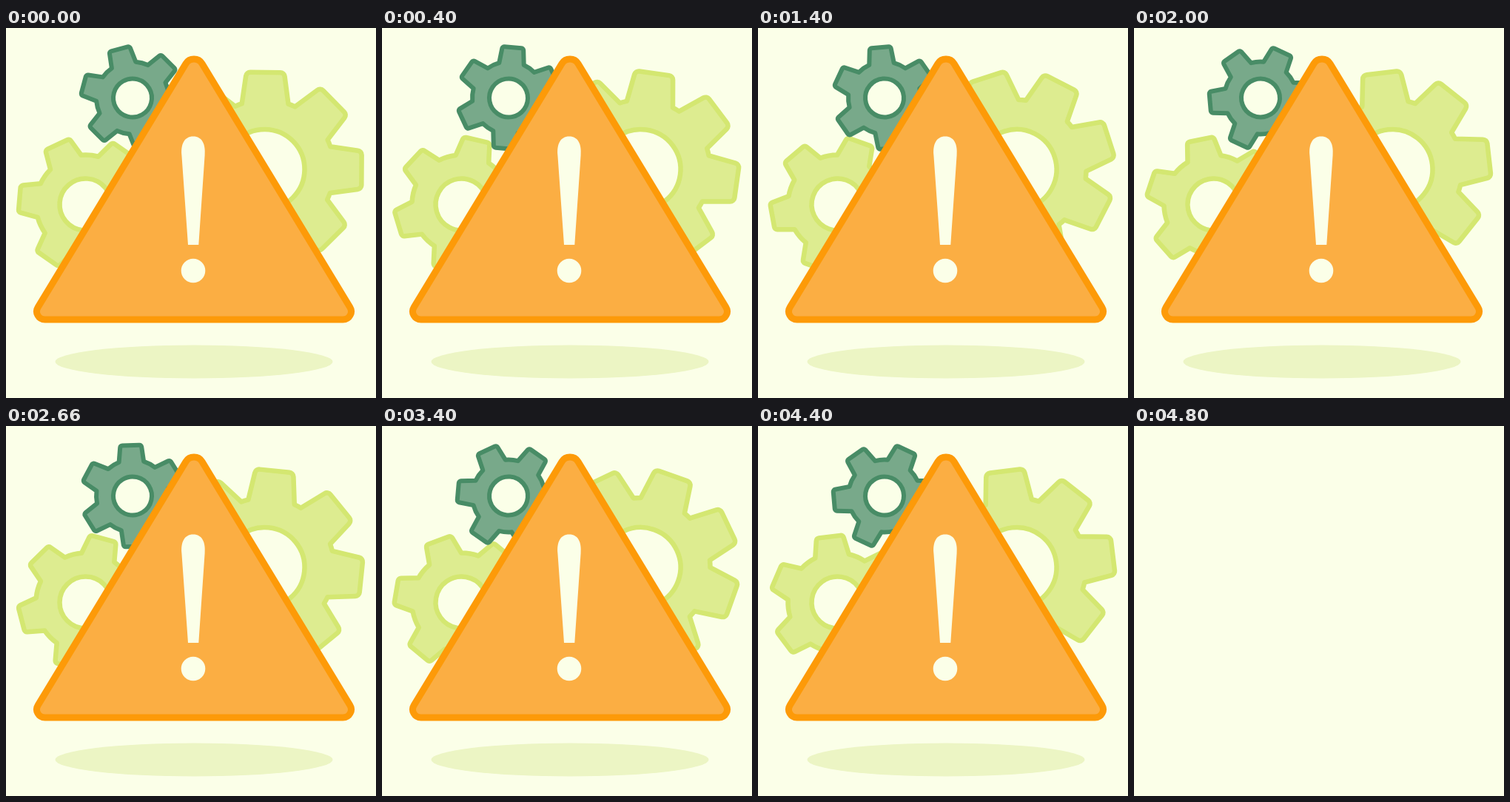
Animation of 500 by 500 pixels, one loop 4.82 s. Source, as an HTML page with a canvas:

```html
<!DOCTYPE html>
<html lang="en">
<head>
<meta charset="utf-8">
<title>Warning gears</title>
<style>
  html, body { margin: 0; width: 100%; height: 100%; overflow: hidden; background: #fbffe8; }
  canvas { display: block; width: 500px; height: 500px; }
</style>
</head>
<body>
<canvas id="stage" width="500" height="500"></canvas>
<script>
const ctx = document.getElementById('stage').getContext('2d');
const LOOP = 4820, SPIN = 4800, STEP = 20;
const BG = '#fbffe8';
const LIME = { fill: '#ddec90', stroke: '#d4e771' };
const GREEN = { fill: '#78a98a', stroke: '#488c66' };
const rad = deg => deg * Math.PI / 180;

// Each turn covers a whole number of teeth; lead is a gentle ease in degrees.
const gears = [
  { x: 349.5, y: 191, teeth: 8, tip: 131, tipHalf: 25.5, root: 94, base: 19.5,
    hole: 54, corner: 6, line: 6.5, paint: LIME, start: 0.4, turn: 90, lead: 0.6 },
  { x: 107.5, y: 238.5, teeth: 6, tip: 89.5, tipHalf: 18, root: 67, base: 20,
    hole: 35, corner: 4, line: 6.5, paint: LIME, start: 4.9, turn: -240, lead: -6.6 },
  { x: 171, y: 94.5, teeth: 6, tip: 68.5, tipHalf: 14.2, root: 49, base: 20,
    hole: 26, corner: 3, line: 6, paint: GREEN, start: 15, turn: 240, lead: 0 }
];

function paintPath({ fill, stroke }, width) {
  ctx.fillStyle = fill;
  ctx.strokeStyle = stroke;
  ctx.lineWidth = width;
  ctx.lineJoin = 'round';
  ctx.fill();
  ctx.stroke();
}

function drawGear(g, u) {
  const pitch = 2 * Math.PI / g.teeth, base = rad(g.base);
  const tipAngle = Math.atan2(g.tipHalf, g.tip), tipRadius = Math.hypot(g.tip, g.tipHalf);
  const at = (r, a) => [r * Math.cos(a), r * Math.sin(a)];
  ctx.save();
  ctx.translate(g.x, g.y);
  ctx.rotate(rad(g.start + g.turn * u + g.lead * Math.sin(Math.PI * u)));
  ctx.beginPath();
  for (let i = 0; i < g.teeth; i++) {
    const a = i * pitch;
    const left = at(tipRadius, a - tipAngle), right = at(tipRadius, a + tipAngle);
    ctx.lineTo(...at(g.root, a - base));
    ctx.arcTo(...left, ...right, g.corner);
    ctx.arcTo(...right, ...at(g.root, a + base), g.corner);
    ctx.arc(0, 0, g.root, a + base, a + pitch - base);
  }
  ctx.closePath();
  paintPath(g.paint, g.line);
  ctx.beginPath();
  ctx.arc(0, 0, g.hole, 0, 2 * Math.PI);
  paintPath({ fill: BG, stroke: g.paint.stroke }, g.line);
  ctx.restore();
}

function drawShadow() {
  ctx.beginPath();
  ctx.ellipse(254, 451, 187.5, 22.5, 0, 0, 2 * Math.PI);
  ctx.fillStyle = '#ecf5c4';
  ctx.fill();
}

function drawTriangle() {
  ctx.beginPath();
  ctx.moveTo(254, 394);
  ctx.arcTo(33, 394, 254, 30, 11);
  ctx.arcTo(254, 30, 475, 394, 13);
  ctx.arcTo(475, 394, 254, 394, 11);
  ctx.closePath();
  paintPath({ fill: '#fbae43', stroke: '#fd9a08' }, 9);
}

function drawMark(t) {
  const phase = Math.min(1, Math.max(0, (t - 420) / 800));
  const swell = 1 + 0.015 * Math.sin(Math.PI * phase) ** 2;
  ctx.save();
  ctx.translate(253, 245);
  ctx.scale(swell, swell);
  ctx.translate(-253, -245);
  ctx.beginPath();
  ctx.moveTo(246, 293);
  ctx.lineTo(237.4, 172);
  ctx.bezierCurveTo(236, 157, 241, 146.5, 253, 146.5);
  ctx.bezierCurveTo(265, 146.5, 270, 157, 268.6, 172);
  ctx.lineTo(260.3, 293);
  ctx.closePath();
  ctx.moveTo(269.3, 328);
  ctx.arc(253, 328, 16.3, 0, 2 * Math.PI);
  ctx.fillStyle = BG;
  ctx.fill();
  ctx.restore();
}

function draw(now) {
  const t = Math.floor((now % LOOP) / STEP) * STEP;
  ctx.fillStyle = BG;
  ctx.fillRect(0, 0, 500, 500);
  if (t < SPIN) {
    drawShadow();
    gears.forEach(g => drawGear(g, t / SPIN));
    drawTriangle();
    drawMark(t);
  }
}

let begin;
function tick(now) {
  begin ??= now;
  draw(now - begin);
  requestAnimationFrame(tick);
}
draw(0);
requestAnimationFrame(tick);
</script>
</body>
</html>
```
